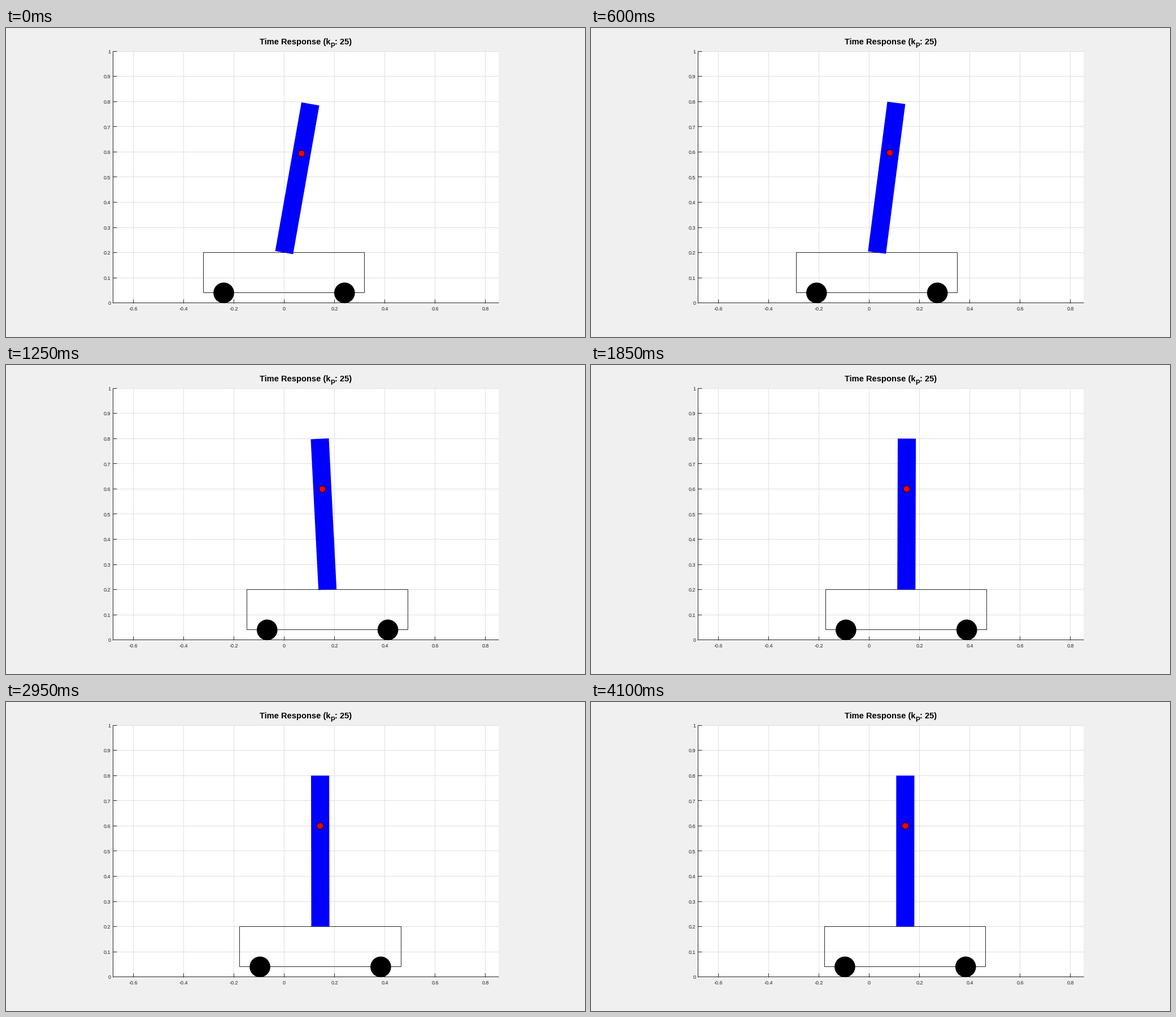
Animation, 1025 px wide and 547 px high, one loop 4.15 s. Source, as a matplotlib script:

```python
import math
import numpy as np
import matplotlib.pyplot as plt
from matplotlib.animation import FuncAnimation
from matplotlib.patches import Circle, Polygon, Rectangle

W, H, DPI = 1025, 547, 128
FRAMES, STEP, HOLD = 83, 50, 3
PT = 72 / DPI                        # one pixel in points
S, X0, Y0 = 445.5, 492.4, 486.7      # pixels per unit, origin
LEFT, RIGHT, TOP, BOTTOM = 189, 872, 41, 487
INK, GRID = "#262626", "#dfdfdf"

fig = plt.figure(figsize=(W / DPI, H / DPI), dpi=DPI, facecolor="#f0f0f0")
ax = fig.add_axes([0, 0, 1, 1])
ax.set_xlim(0, W)
ax.set_ylim(H, 0)
ax.axis("off")


def px(x):
    return X0 + S * x


def py(y):
    return Y0 - S * y


def line(x1, y1, x2, y2, color, z):
    # half-pixel shift so snapping lands on the pixel containing the point
    ax.plot([x1 - .5, x2 - .5], [y1 - .5, y2 - .5], color=color, lw=PT,
            zorder=z, solid_capstyle="butt")


def text(x, y, s, size, ha, color=INK, weight="normal"):
    ax.text(x, y, s, fontsize=size * PT, ha=ha, va="baseline", color=color,
            weight=weight, family="Liberation Sans")


def hermite(n, keys):
    """Cubic curve through (time, value, slope) keys."""
    for (a, p, u), (b, q, v) in zip(keys, keys[1:]):
        if n <= b:
            d = b - a
            t = (n - a) / d
            return (p * (2 * t**3 - 3 * t**2 + 1) + u * d * (t**3 - 2 * t**2 + t)
                    + q * (3 * t**2 - 2 * t**3) + v * d * (t**3 - t**2))


def ringing(n, amp, mid):
    m = n - mid
    return amp * math.exp(-.085 * m) * math.sin(.161 * m)


SETTLE = 14
CART_KEYS = [(0, 0, 0), (3, .6, .6), (11, 27.1, 8.3),
             (SETTLE, 64 - ringing(SETTLE, 5, 36), 6.3)]
LEAN_KEYS = [(0, 30.94, 0), (3, 30.7, -.2), (11, 14.5, -5.2),
             (SETTLE, ringing(SETTLE, 3.65, 33), -3.8)]


def pose(n):
    """Cart shift in pixels and rod angle in radians."""
    if n < SETTLE:
        shift, lean = hermite(n, CART_KEYS), hermite(n, LEAN_KEYS)
    else:
        shift, lean = 64 - ringing(n, 5, 36), ringing(n, 3.65, 33)
    return shift, math.asin(lean / (.4 * S))


# axes
ax.add_patch(Rectangle((LEFT, TOP), RIGHT - LEFT, BOTTOM - TOP,
                       fc="white", ec="none", zorder=0))
for k in range(-3, 5):
    x = px(.2 * k)
    line(x, TOP, x, BOTTOM, GRID, 1)
    line(x, BOTTOM - 7, x, BOTTOM, INK, 2)
    text(x, 500, f"{.2 * k:.1f}" if k else "0", 9, "center")
for k in range(11):
    y = py(.1 * k)
    line(LEFT, y, RIGHT, y, GRID, 1)
    line(LEFT + .5, y, LEFT + 7.5, y, INK, 2)
    text(185.3, y + 3.7, f"{.1 * k:.1f}" if k % 10 else str(k // 10), 9, "right")
line(LEFT + .5, TOP, LEFT + .5, BOTTOM, INK, 2)
line(LEFT, Y0, RIGHT, Y0, INK, 2)

# title with a subscript
text(448.9, 28.6, "Time Response (k", 14.6, "left", "black", "bold")
text(573.8, 35, "P", 11.7, "left", "black", "bold")
text(581.6, 28.6, ": 25)", 14.6, "left", "black", "bold")

# moving parts
body = Rectangle((0, py(.2) - .5), .64 * S, .16 * S, fill=False, ec=INK,
                 lw=PT, zorder=3)
wheels = [Circle((0, py(.04)), 18.3, fc="black", ec="none", zorder=4)
          for _ in range(2)]
rod = Polygon(np.zeros((4, 2)), closed=True, fc="#0000ff", ec="none", zorder=5)
dot = Circle((0, 0), 5.7, fc="red", ec="black", lw=PT, zorder=6)
parts = [body, *wheels, rod, dot]
for part in parts:
    ax.add_patch(part)


def draw(i):
    shift, angle = pose(max(0, i - HOLD))
    base = np.array([X0 + shift, py(.2)])
    along = S * np.array([math.sin(angle), -math.cos(angle)])
    side = .036 * S * np.array([math.cos(angle), math.sin(angle)])
    top = base + .6 * along
    body.set_x(base[0] - .32 * S - .5)
    for wheel, dx in zip(wheels, (-.24, .24)):
        wheel.center = (base[0] + dx * S, py(.04))
    rod.set_xy([base - side, base + side, top + side, top - side])
    dot.center = tuple(base + .4 * along)
    return parts


anim = FuncAnimation(fig, draw, frames=FRAMES, interval=STEP,
                     init_func=lambda: draw(0), repeat=True, repeat_delay=0)
plt.show()
```
